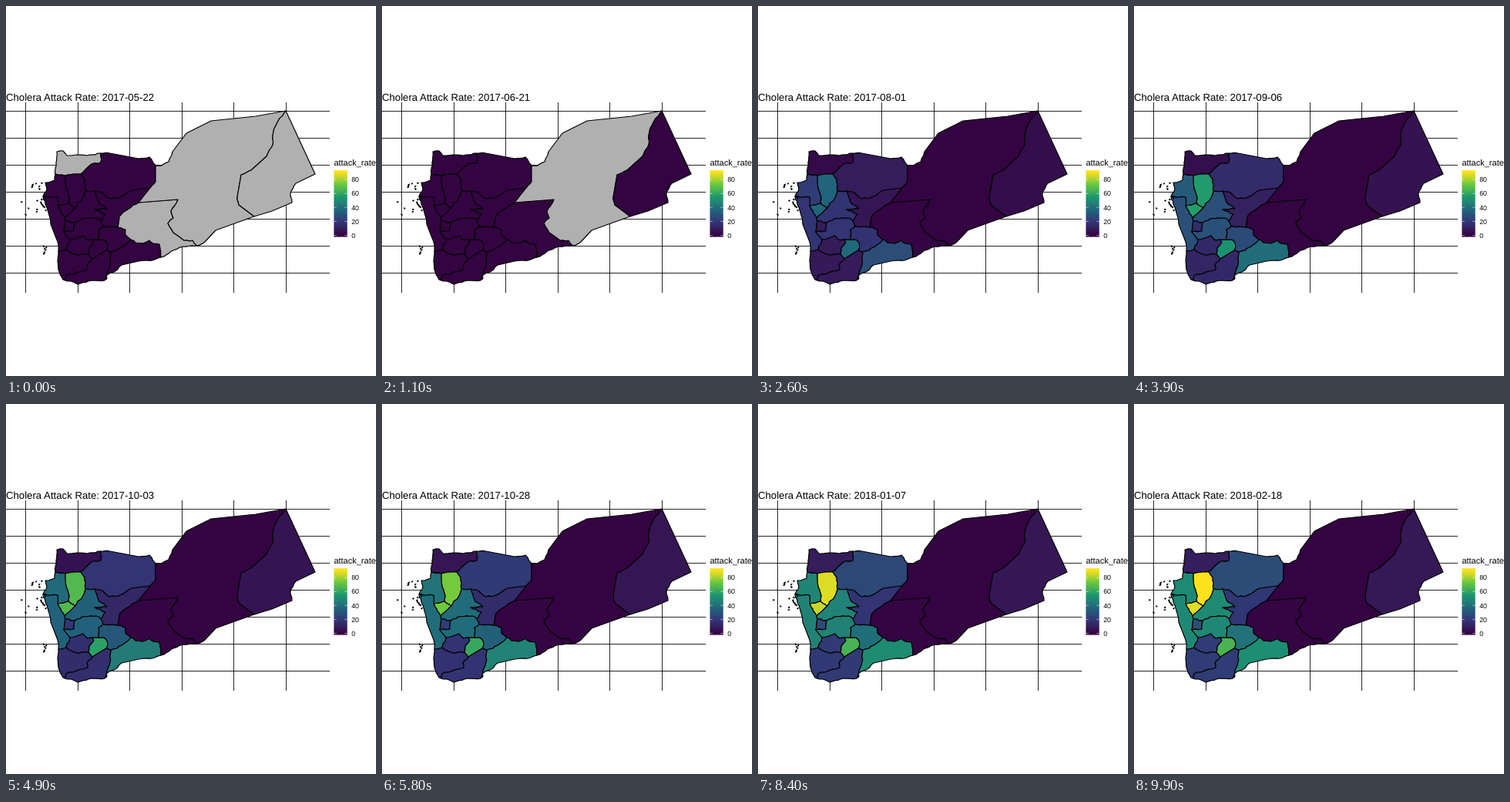
Animation of 480 by 480 pixels, one loop 10000 ms. Source, as an HTML page:

```html
<!DOCTYPE html>
<html lang="en">
<head>
<meta charset="utf-8">
<title>Cholera Attack Rate</title>
<style>
html, body { margin: 0; width: 100%; height: 100%; overflow: hidden; background: #fff; }
svg { display: block; width: 480px; height: 480px; }
text { font-family: "Liberation Sans", Arial, sans-serif; text-rendering: geometricPrecision; }
</style>
</head>
<body>
<svg id="stage" viewBox="0 0 480 480"></svg>
<script>
const stage = document.getElementById('stage');

function add(tag, attrs, text = '', parent = stage) {
  const node = document.createElementNS('http://www.w3.org/2000/svg', tag);
  for (const key in attrs) node.setAttribute(key, attrs[key]);
  node.textContent = text;
  return parent.appendChild(node);
}

let seed = 7;
function random() {
  seed = (seed * 16807) % 2147483647;
  return seed / 2147483647;
}
const spread = size => (random() * 2 - 1) * size;

// Corners where regions or coast meet.
const corners = {
  A: '64,218', B: '77,220', C: '97,218', D: '123,191', E: '194,207', F: '187,236', G: '115,240',
  H: '103,240', I: '81,256', J: '67,259', K: '48,247', L: '90,262', M: '76,275', N: '77,279',
  O: '89,281', P: '75,293', Q: '83,303', R: '78,316', S: '68,318', T: '107,322', U: '112,303',
  V: '120,303', W: '123,279', X: '126,286', Y: '145,287', Z: '172,255', a: '162,303', b: '201,326',
  d: '131,349', e: '112,328', f: '77,356', g: '248,311', h: '322,273', i: '363,136', j: '401,218',
  m: '130,317', n: '136,319'
};

// Bends on the way from one corner to the next; other borders run direct.
const bends = {
  AD: '65,203 66,189 74,188 79,194 92,193 105,194',
  DC: '123,203 111,205',
  CB: '88,218',
  DE: '135,191 172,198 186,196',
  EF: '194,228',
  FG: '163,239 146,249 135,250 122,241',
  HC: '102,225',
  HL: '100,249 93,256',
  IB: '82,249 78,237',
  JK: '67,248 58,248',
  KA: '53,237 51,229 63,226',
  SK: '67,306 58,283 55,268 51,257',
  GW: '121,256 131,263 115,264 129,270',
  WO: '117,275 99,276',
  ZY: '158,264 147,273',
  OP: '88,292',
  XV: '120,290',
  UQ: '106,304 100,298',
  UT: '114,307 108,314',
  TR: '92,323 82,319',
  ef: '105,336 106,342 90,347 79,349',
  fS: '74,355 68,342 67,331',
  Vm: '127,303 132,310',
  Ya: '155,290 155,297',
  an: '153,311 144,317',
  nd: '135,335',
  df: '128,356 112,356 93,361 84,357',
  ab: '168,307 177,308 186,304 191,308 199,309',
  bd: '190,330 172,331 150,336 142,344',
  Zg: '223,251 214,266 217,275 210,282 217,294 231,304 242,304',
  gb: '230,312 217,317',
  Ei: '202,207 211,202 216,189 234,165 266,149 324,143',
  ih: '353,149 347,163 346,180 338,195 318,213 305,219 300,248 302,258',
  hg: '294,283 272,291 258,306',
  jh: '376,230 369,243 371,255 345,266'
};

// Long stretches are surveyed straight, short ones are worn ragged.
function roughen(points) {
  return points.flatMap(([x, y], i) => {
    if (i === 0) return [[x, y]];
    const [px, py] = points[i - 1];
    const length = Math.hypot(x - px, y - py);
    const pieces = length > 20 ? 1 : Math.max(1, Math.round(length / 4));
    return Array.from({ length: pieces }, (_, k) => {
      const t = (k + 1) / pieces, wear = t < 1 ? 0.8 : 0;
      return [px + (x - px) * t + spread(wear), py + (y - py) * t + spread(wear)];
    });
  });
}

const borders = {};
function border(from, to) {
  const key = from + to, back = to + from;
  if (borders[back]) return [...borders[back]].reverse();
  if (bends[back] && !bends[key]) {
    border(to, from);
    return border(from, to);
  }
  const spec = [corners[from], bends[key], corners[to]].filter(Boolean).join(' ');
  return borders[key] ??= roughen(spec.split(' ').map(p => p.split(',').map(Number)));
}

function ringPath(ring) {
  const points = [...ring].flatMap((c, i) => border(c, ring[(i + 1) % ring.length]));
  return 'M' + points.map(p => p.map(v => v.toFixed(1))).join('L') + 'Z';
}

// Corners around the region, final rate, pace of the outbreak, first step with data.
const regions = [
  ['ADCB', 10, 1, 4],
  ['DEFGHC', 27, 2],
  ['BCHLI', 90.6, 2.7],
  ['ABIJK', 50, 3],
  ['JILM', 87, 3],
  ['KJMNPQRS', 49, 2.4],
  ['LHGWONM', 50, 2.2],
  ['GFZYXW', 19, 2.3],
  ['NOP', 28, 2],
  ['OWXVUQP', 49, 2.4],
  ['QUTR', 21, 3],
  ['SRTef', 21, 2.6],
  ['UVmeT', 65, 5],
  ['XYanmV', 41, 3],
  ['femnd', 21, 3],
  ['nabd', 51, 4.5],
  ['YZgba', 0.5, 3, 4],
  ['EihgZF', 0, 1, 13],
  ['ijh', 7.5, 4, 8]
];

const steps = 100, stepMs = 100, totalDays = 272, onset = 11;
const firstDay = Date.UTC(2017, 4, 22);
const maxRate = 90.6;

// Viridis, shown in a 1.8 gamma space.
const palette = ['440154', '45256d', '414487', '3a5e8b', '2a788e', '2e9089',
  '22a884', '57bd6b', '7ad151', 'c0dc3f', 'fde725']
  .map(hex => [0, 2, 4].map(i => tone(parseInt(hex.slice(i, i + 2), 16))));

function tone(value) {
  const c = value / 255;
  const linear = c <= 0.04045 ? c / 12.92 : ((c + 0.055) / 1.055) ** 2.4;
  return Math.round(255 * linear ** (1 / 1.8));
}

function rateColor(rate) {
  const pos = rate / maxRate * (palette.length - 1);
  const i = Math.min(Math.floor(pos), palette.length - 2);
  return `rgb(${palette[i].map((v, j) => Math.round(v + (palette[i + 1][j] - v) * (pos - i)))})`;
}

function rateAt(step, final, pace) {
  const u = Math.max(0, (step - onset) / (steps - 1 - onset));
  return final * (1 - Math.exp(-pace * u)) / (1 - Math.exp(-pace));
}

// Graticule on whole pixels
const snap = v => Math.floor(v) + 0.5;
let grid = '';
for (let i = 0; i < 6; i++) grid += `M${snap(25.4 + 67.63 * i)},125V372`;
for (let i = 0; i < 7; i++) grid += `M0,${snap(136.3 + 35.1 * i)}H420`;
add('path', { d: grid, stroke: '#000', 'stroke-width': 0.85, fill: 'none' });

const outline = { stroke: '#000', 'stroke-width': 1.2, 'stroke-linejoin': 'round' };
const shapes = regions.map(([ring]) => add('path', { d: ringPath(ring), ...outline }));

// Island groups: centre, reach and count
let islets = '';
for (const [x, y, rx, ry, count] of [[40, 233, 7, 4, 7], [45, 257, 6, 11, 12], [26, 262, 7, 12, 3], [50, 316, 2, 6, 6], [127, 354, 3, 2, 3]]) {
  for (let i = 0; i < count; i++) {
    islets += `M${x + spread(rx)},${y + ry * (2 * (i + 0.5) / count - 1)}l1.5,${spread(1)}l-.6,1z`;
  }
}
add('path', { d: islets, ...outline });

// Legend
const scale = add('linearGradient', { id: 'scale', x1: 0, y1: 1, x2: 0, y2: 0 });
palette.forEach((rgb, i) =>
  add('stop', { offset: 0.025 + 0.095 * i, 'stop-color': `rgb(${rgb})` }, '', scale));
add('text', { x: 425.4, y: 207, 'font-size': 11 }, 'attack_rate');
add('rect', { x: 425.4, y: 213.2, width: 17.3, height: 86.4, fill: 'url(#scale)' });
for (let rate = 0; rate <= 80; rate += 20) {
  const y = 297.6 - rate * 0.906;
  add('path', { d: `M425.4,${y}h3.5M439.2,${y}h3.5`, stroke: '#fff', 'stroke-width': 0.5 });
  add('text', { x: 448.2, y: y + 3.2, 'font-size': 8.8 }, rate);
}

const title = add('text', { x: 0, y: 123, 'font-size': 13.2 });

function render(ms) {
  const step = Math.floor(ms / stepMs) % steps;
  const day = Math.floor(step * totalDays / (steps - 1));
  title.textContent = 'Cholera Attack Rate: ' + new Date(firstDay + day * 864e5).toISOString().slice(0, 10);
  regions.forEach(([, final, pace, since = 0], i) =>
    shapes[i].setAttribute('fill', step < since ? '#b0b0b0' : rateColor(rateAt(step, final, pace))));
}

const start = performance.now();
function tick() {
  render(performance.now() - start);
  requestAnimationFrame(tick);
}
render(0);
requestAnimationFrame(tick);
</script>
</body>
</html>
```
